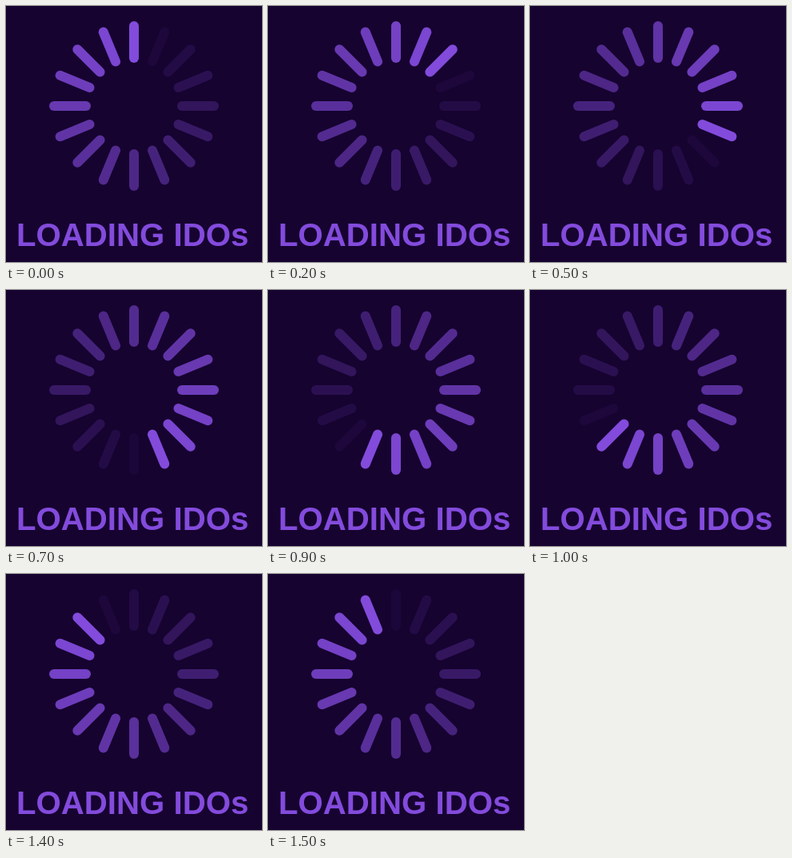
Write an HTML page that moves like this. It is 320 by 320 pixels and loops after 1.6 s.

```html
<!DOCTYPE html>
<html lang="en">
<head>
<meta charset="utf-8">
<title>Loading</title>
<style>
  html, body { margin: 0; width: 100%; height: 100%; overflow: hidden; background: #160330; }
  svg { display: block; width: 100%; height: 100%; fill: #834bdc; }
  text { font: bold 40.2px "Liberation Sans", Arial, sans-serif; }
</style>
</head>
<body>
<svg viewBox="0 0 320 320">
  <g id="spinner"></g>
  <text x="13" y="300">LOADING IDOs</text>
</svg>
<script>
  const COUNT = 16, STEP = 100;
  const spinner = document.getElementById('spinner');

  const bars = Array.from({ length: COUNT }, (_, i) => {
    const bar = document.createElementNS('http://www.w3.org/2000/svg', 'rect');
    const attrs = { x: 154, y: 19, width: 12, height: 52, rx: 6,
                    transform: `rotate(${i * 360 / COUNT} 160 125)` };
    for (const name in attrs) bar.setAttribute(name, attrs[name]);
    return spinner.appendChild(bar);
  });

  const start = performance.now();

  // The lit bar advances one place per step; the others fade with age.
  function draw() {
    const head = Math.floor(Math.max(0, performance.now() - start) / STEP) % COUNT;
    bars.forEach((bar, i) => {
      const age = (head - i + COUNT) % COUNT;
      bar.setAttribute('opacity', 1 - age / COUNT);
    });
    requestAnimationFrame(draw);
  }
  draw();
</script>
</body>
</html>
```
